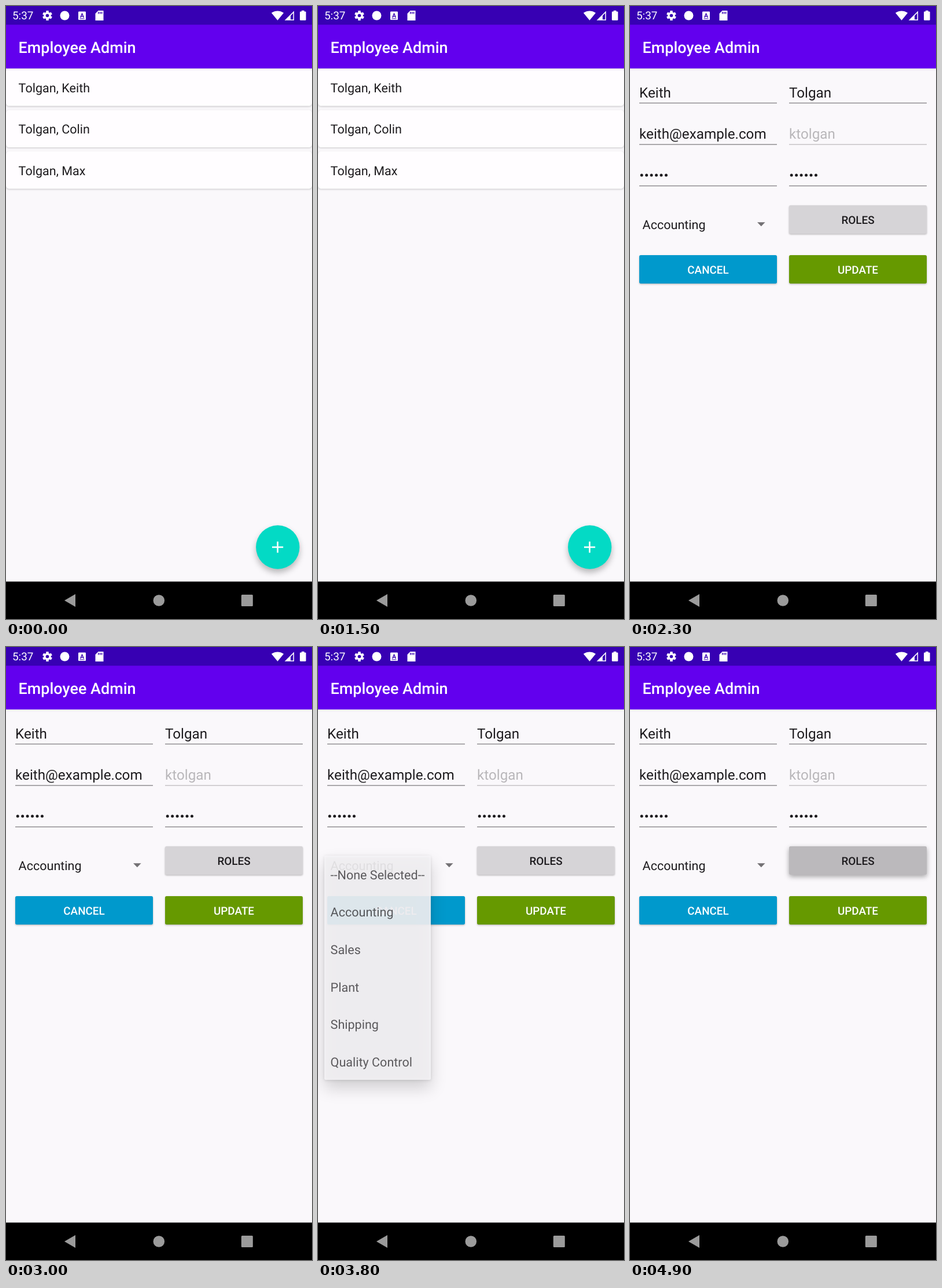
An HTML page with a canvas for the animation above (5000 ms loop, 529 by 1058 pixels).

```html
<!DOCTYPE html>
<html lang="en">
<head>
<meta charset="utf-8">
<title>Employee Admin</title>
<style>
  html, body { margin: 0; width: 100%; height: 100%; overflow: hidden; background: #faf8fb; }
  canvas { display: block; width: 529px; height: 1058px; }
</style>
</head>
<body>
<canvas id="stage"></canvas>
<script>
const W = 529, H = 1058, LOOP = 5000, STEP = 100;
const BAR_END = 107.75, NAV_TOP = 993.4, MARGIN = 21.6;
const PAPER = '#faf8fb', INK = '#1d1b1e';

const canvas = document.getElementById('stage');
const dpr = window.devicePixelRatio || 1;
canvas.width = W * dpr;
canvas.height = H * dpr;
const c = canvas.getContext('2d');
c.textRendering = 'geometricPrecision';

const people = ['Tolgan, Keith', 'Tolgan, Colin', 'Tolgan, Max'];
const departments = ['--None Selected--', 'Accounting', 'Sales', 'Plant', 'Shipping', 'Quality Control'];

const clamp = v => Math.max(0, Math.min(1, v));
const span = (t, from, to) => clamp((t - from) / (to - from));
const ease = p => 0.5 - 0.5 * Math.cos(Math.PI * p);

function text(str, x, y, size, color = INK, weight = 400, align = 'left') {
  c.font = `${weight} ${size}px Roboto, sans-serif`;
  c.textAlign = align;
  c.fillStyle = color;
  c.fillText(str, x, y);
}

function rect(x, y, w, h, color) {
  c.fillStyle = color;
  c.fillRect(x, y, w, h);
}

function round(x, y, w, h, r, color) {
  c.beginPath();
  c.roundRect(x, y, w, h, r);
  c.fillStyle = color;
  c.fill();
}

function disc(x, y, r, color) {
  c.beginPath();
  c.arc(x, y, r, 0, Math.PI * 2);
  c.fillStyle = color;
  c.fill();
}

function poly(points, color) {
  c.beginPath();
  points.forEach(([x, y]) => c.lineTo(x, y));
  c.closePath();
  c.fillStyle = color;
  c.fill();
}

// Canvas shadows ignore the transform, so scale them by hand.
function shadowed(dy, blur, alpha, draw) {
  c.save();
  c.shadowColor = `rgba(0,0,0,${alpha})`;
  c.shadowOffsetY = dy * dpr;
  c.shadowBlur = blur * dpr;
  draw();
  c.restore();
}

function shifted(dx, draw) {
  c.save();
  c.translate(dx, 0);
  draw();
  c.restore();
}

function drawGear(x, y) {
  c.save();
  c.translate(x, y);
  for (let i = 0; i < 6; i++) {
    rect(-2.2, -8.4, 4.4, 5, '#fff');
    c.rotate(Math.PI / 3);
  }
  c.restore();
  disc(x, y, 6.2, '#fff');
  disc(x, y, 2.8, '#3700b3');
}

function drawStatus() {
  const bg = '#3700b3';
  rect(0, 0, W, 32.3, bg);
  text('5:37', 11, 23.2, 18.9, '#fff');
  drawGear(71.5, 16.5);
  disc(101.5, 16.5, 8, '#fff');

  round(125, 9.5, 13, 14.5, 1.2, '#fff');
  text('A', 131.5, 20, 10.5, bg, 700, 'center');
  rect(127.5, 21.3, 8, 1, bg);

  poly([[159.5, 8], [168.5, 8], [168.5, 25], [154.5, 25], [154.5, 13]], '#fff');
  for (let i = 0; i < 3; i++) rect(159 + i * 2.9, 10, 1.5, 3.6, bg);

  c.beginPath();
  c.moveTo(469.5, 24.8);
  c.lineTo(459, 11.9);
  c.bezierCurveTo(459.4, 11.6, 463.4, 8.4, 469.5, 8.4);
  c.bezierCurveTo(475.6, 8.4, 479.6, 11.6, 480, 11.9);
  c.fillStyle = '#fff';
  c.fill();

  poly([[481.7, 24.8], [498, 24.8], [498, 8.5]], '#fff');
  poly([[492, 16.8], [496.5, 12.3], [496.5, 23.3], [492, 23.3]], bg);

  rect(511, 7.8, 4.6, 3, '#fff');
  round(508, 9.5, 10.6, 15.3, 1.3, '#fff');
}

function drawAppBar() {
  shadowed(1, 4, 0.1, () => rect(0, 32, W, BAR_END - 32, '#6200ee'));
  text('Employee Admin', MARGIN, 80.8, 26.94, '#fff', 500);
}

function drawNav() {
  const grey = '#9b9b9b';
  rect(0, NAV_TOP, W, H - NAV_TOP, '#000');
  poly([[101, 1026], [120, 1015], [120, 1037]], grey);
  disc(264.3, 1026, 9.8, grey);
  round(406.8, 1016, 20, 20, 1.5, grey);
}

function drawList() {
  people.forEach((name, i) => {
    const y = 108 + i * 71.4;
    shadowed(1.1, 3.2, 0.21, () => round(0, y, W, 64.6, 5.4, '#fffdff'));
    text(name, MARGIN, y + 41, 21.55);
  });
  shadowed(6, 11, 0.27, () => disc(469.8, 934, 37.7, '#03dac5'));
  rect(460, 932.7, 19.2, 2.6, '#fff');
  rect(468.3, 924.4, 2.6, 19.2, '#fff');
}

function drawField(x, y, value, off) {
  text(value, x, y - 9.8, 24.24, off ? '#b9b7ba' : INK);
  rect(x, y - 0.7, 238, 1.35, off ? '#c0bec1' : '#858386');
}

function drawSecret(x) {
  for (let i = 0; i < 6; i++) disc(x + 4.2 + i * 8.45, 292, 2.5, INK);
  drawField(x, 310.5, '');
}

function drawButton(x, y, label, fill, color, lift = 0) {
  shadowed(1.3 + lift * 2, 3 + lift * 5, 0.27 + lift * 0.08,
    () => round(x, y, 238, 49, 2.7, fill));
  text(label, x + 119, y + 32, 18.86, color, 500, 'center');
}

function drawForm(press) {
  drawField(16, 167.5, 'Keith');
  drawField(275, 167.5, 'Tolgan');
  drawField(16, 239, 'keith@example.com');
  drawField(275, 239, 'ktolgan', true);
  drawSecret(16);
  drawSecret(275);

  text('Accounting', MARGIN, 385, 21.55);
  poly([[220, 373.3], [233.6, 373.3], [226.8, 380.2]], '#737174');

  const shade = Math.round(214 - 27 * press);
  drawButton(275, 344, 'ROLES', `rgb(${shade},${shade - 2},${shade + 1})`, INK, press);
  drawButton(16, 430, 'CANCEL', '#0099cc', '#fff');
  drawButton(275, 430, 'UPDATE', '#669900', '#fff');
}

function drawMenu(alpha) {
  c.save();
  c.globalAlpha = alpha;
  shadowed(14, 28, 0.24, () => round(11, 360, 184, 387, 2.7, PAPER));
  shadowed(1, 5, 0.16, () => round(11, 360, 184, 387, 2.7, PAPER));
  departments.forEach((name, i) => text(name, MARGIN, 400.6 + i * 64.65, 21.55));
  c.restore();
}

function render(t) {
  const slide = ease(span(t, 1512.4, 1812.4));
  const formX = Math.round(W * (1 - slide));
  const menu = span(t, 3050, 3200) * (1 - span(t, 3740, 3940));
  const press = ease(span(t, 4500, 4850));

  c.setTransform(dpr, 0, 0, dpr, 0, 0);
  rect(0, 0, W, H, PAPER);

  if (formX > 0) shifted(formX - W, drawList);
  if (formX < W) shifted(formX, () => drawForm(press));
  if (menu > 0) drawMenu(menu);

  drawAppBar();
  drawStatus();
  drawNav();
}

// The screen ticks ten times a second.
let start = null;
function tick(now) {
  if (start === null) start = now;
  const t = (now - start) % LOOP;
  render(Math.floor(t / STEP) * STEP);
  requestAnimationFrame(tick);
}
render(0);
requestAnimationFrame(tick);
</script>
</body>
</html>
```
